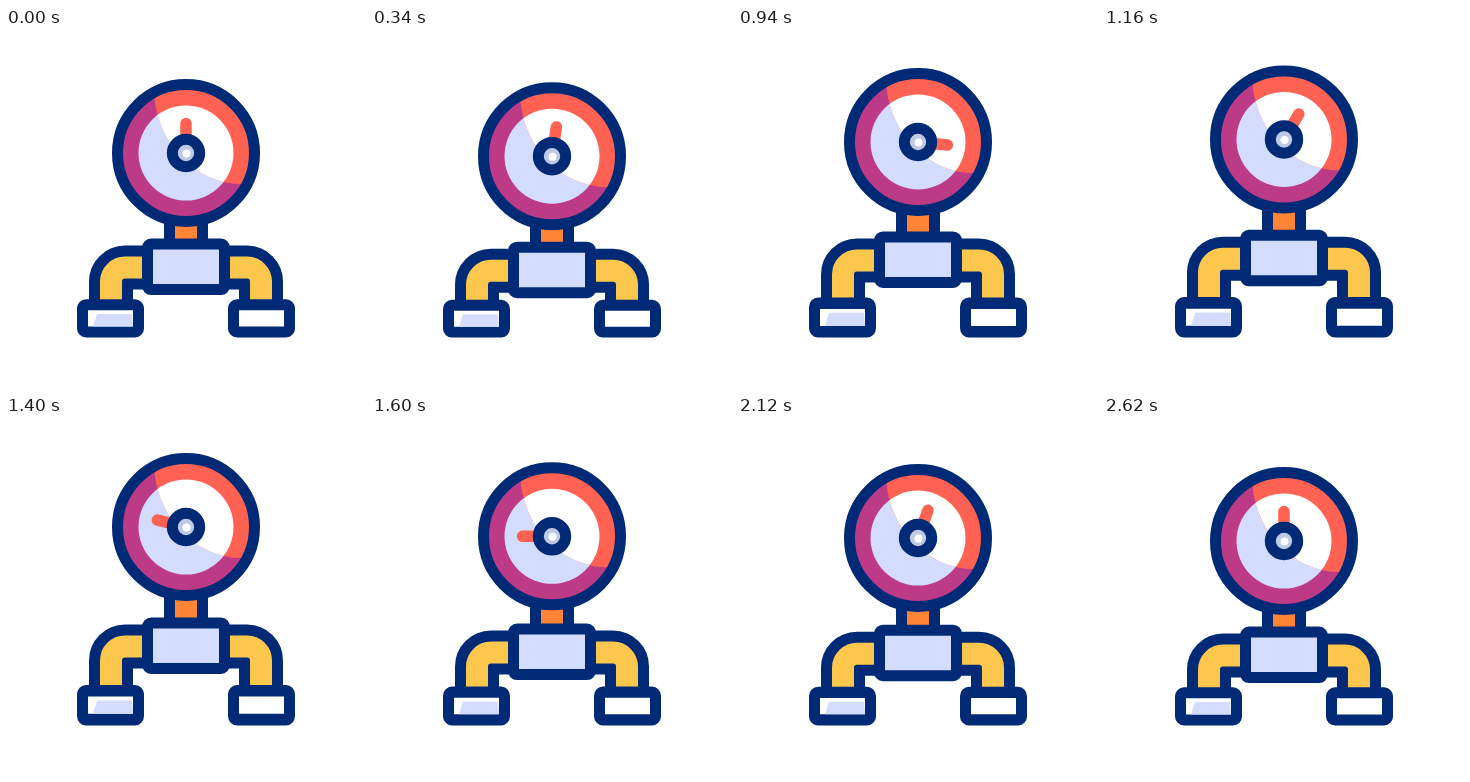
An HTML page that plays this animation: 360x360 px, repeating every 2800 ms.

```html
<!DOCTYPE html>
<html lang="en">
<head>
<meta charset="utf-8">
<title>Pressure gauge</title>
<style>
  html, body { margin: 0; height: 100%; overflow: hidden; background: #fff; }
  svg { display: block; width: 100%; height: 100%; }
  .line { stroke: #012a76; stroke-width: 11; stroke-linejoin: round; }
  .outer { stroke: #012a76; stroke-width: 44; }
  .inner { stroke: #fdc74d; stroke-width: 22; }
</style>
</head>
<body>
<svg viewBox="0 0 360 360" fill="none">
  <defs>
    <clipPath id="lit"><ellipse cx="236" cy="60" rx="88" ry="96"/></clipPath>
    <path id="bend" d="M105 288V253A14 14 0 0 1 119 239H142"/>
    <g id="pipe">
      <use href="#bend" class="outer"/>
      <use href="#bend" class="inner"/>
    </g>
    <rect id="flange" class="line" x="76.5" y="276.8" width="56" height="27.2" rx="3.5" fill="#fff"/>
  </defs>

  <path id="neckEdge" stroke="#012a76" stroke-width="44"/>
  <path id="neckFill" stroke="#ff8436" stroke-width="22"/>

  <g id="body">
    <use href="#pipe"/>
    <use href="#pipe" transform="matrix(-1 0 0 1 360 0)"/>
    <rect class="line" x="141.5" y="215.5" width="77" height="45.5" rx="3.5" fill="#d3dcfd"/>
  </g>

  <g id="feet">
    <use href="#flange"/>
    <path d="M87 298.5L91 286H126L127 298.5Z" fill="#d3dcfd"/>
    <use href="#flange" transform="matrix(-1 0 0 1 360 0)"/>
  </g>

  <g id="gauge">
    <circle cx="180" cy="125" r="64" fill="#bd3b86"/>
    <circle cx="180" cy="125" r="47.5" fill="#d3dcfd"/>
    <g clip-path="url(#lit)">
      <circle cx="180" cy="125" r="64" fill="#ff6152"/>
      <circle cx="180" cy="125" r="47.5" fill="#fff"/>
    </g>
    <circle class="line" cx="180" cy="125" r="68.5"/>
    <path id="needle" d="M180 125V95.5" stroke="#ff6152" stroke-width="11.5" stroke-linecap="round"/>
    <circle class="line" cx="180" cy="125" r="13.7" fill="#c0c9e4"/>
    <circle cx="180.5" cy="125.5" r="4" fill="#fff"/>
  </g>
</svg>
<script>
const LOOP = 2800;
const $ = id => document.getElementById(id);

// Keys are [time, value] pairs
const lift = [[0, 0], [220, 0], [390, 4], [560, -0.5], [740, -8], [940, -11], [1260, -14],
  [1400, -14], [1800, 4.5], [1990, -6], [2120, -3], [2380, 0], [2800, 0]];
const swing = [[0, 0], [220, 0], [850, 96], [930, 96], [1500, -90], [1800, -90],
  [2130, 20], [2600, 0], [2800, 0]];

const segment = (keys, t) => Math.max(1, keys.findIndex(k => k[0] > t));

function eased(keys, t) {
  const i = segment(keys, t), [t0, a] = keys[i - 1], [t1, b] = keys[i];
  return a + (b - a) * (1 - Math.cos(Math.PI * (t - t0) / (t1 - t0))) / 2;
}

// Cubic curve with flat tangents at the turning points
function smooth(keys, t) {
  const i = segment(keys, t), [t0, a] = keys[i - 1], [t1, b] = keys[i];
  const slope = n => {
    if (n < 1 || n > keys.length - 2) return 0;
    const [p, q, r] = [keys[n - 1], keys[n], keys[n + 1]];
    const before = (q[1] - p[1]) / (q[0] - p[0]), after = (r[1] - q[1]) / (r[0] - q[0]);
    return before * after > 0 ? 2 * before * after / (before + after) : 0;
  };
  const d = t1 - t0, u = (t - t0) / d, v = 1 - u;
  return a * v * v * (1 + 2 * u) + b * u * u * (3 - 2 * u)
    + d * u * v * (slope(i - 1) * v - slope(i) * u);
}

function draw(t) {
  const top = smooth(lift, t);
  const mid = 0.6 + top * (top < 0 ? 0.65 : 0.95);
  const neck = `M180 ${192 + top}V${220 + mid}`;
  $('gauge').setAttribute('transform', `translate(0 ${top})`);
  $('body').setAttribute('transform', `translate(0 ${mid})`);
  $('feet').setAttribute('transform', `translate(0 309) scale(1 ${1 - top * 0.0045}) translate(0 -309)`);
  $('neckEdge').setAttribute('d', neck);
  $('neckFill').setAttribute('d', neck);
  $('needle').setAttribute('transform', `rotate(${eased(swing, t)} 180 125)`);
}

const start = performance.now();
function tick() {
  draw((performance.now() - start) % LOOP);
  requestAnimationFrame(tick);
}
tick();
</script>
</body>
</html>
```
